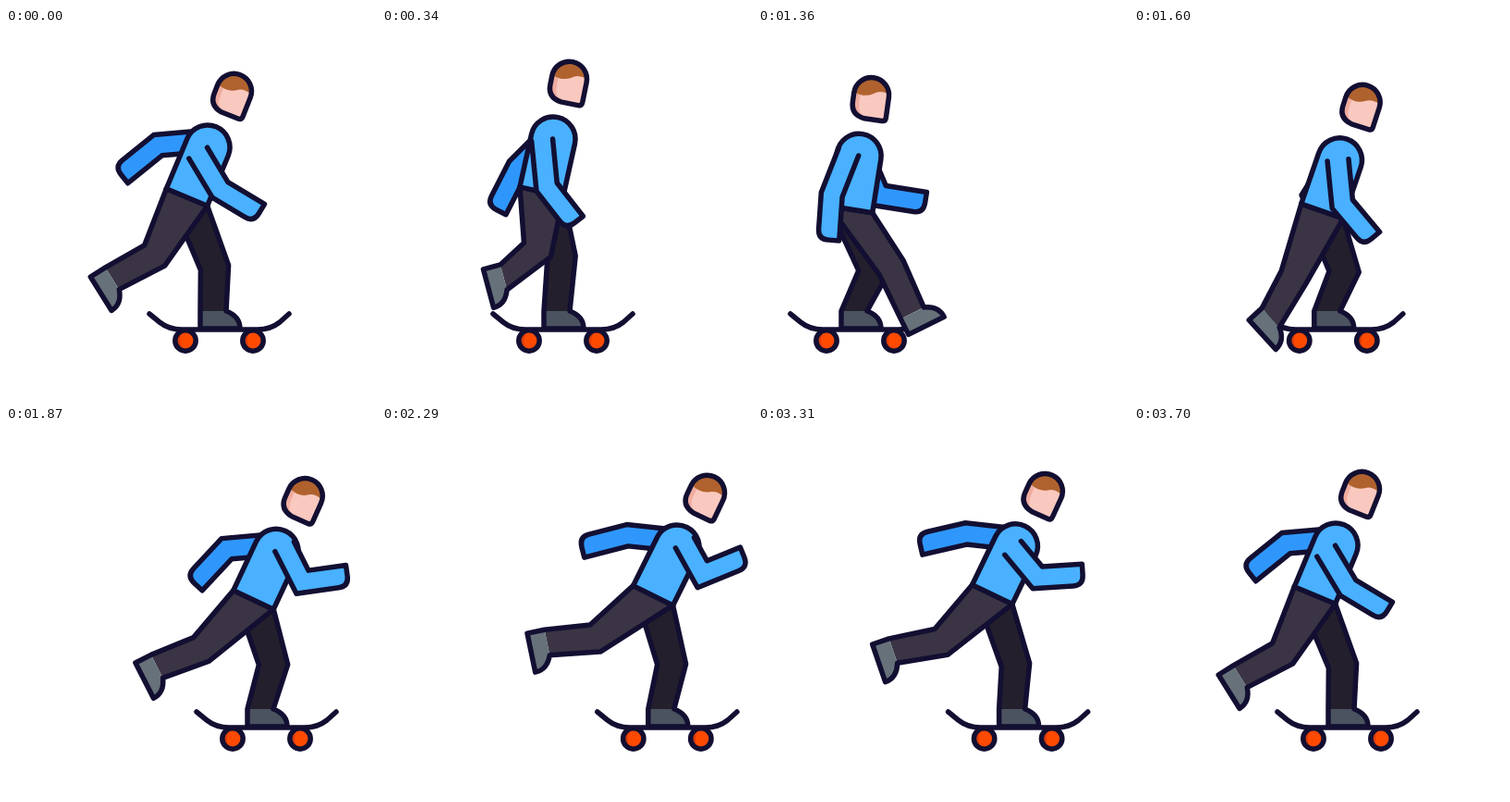
Animation, 400 px wide and 400 px high, one loop 3.76 s. Source, as an HTML page:

```html
<!DOCTYPE html>
<html lang="en">
<head>
<meta charset="utf-8">
<title>Skater</title>
<style>
html, body { margin: 0; width: 100%; height: 100%; overflow: hidden; background: #fff; }
svg { display: block; width: 100vw; height: 100vh; }
.ink { fill: none; stroke: #120f32; stroke-width: 5.5; stroke-linecap: round; stroke-linejoin: round; }
</style>
</head>
<body>
<svg viewBox="0 0 400 400">
  <g id="farArm"><path fill="#2f97fc"/><path class="ink"/></g>
  <g id="farLeg"><path fill="#241f2c"/><path fill="#4a535f"/><path class="ink"/></g>
  <g id="board">
    <path class="ink" d="M-39 309L-28 318Q-18 326-4 326H78Q92 326 102 318L112 309"/>
    <g id="wheel">
      <circle cy="338" r="11.2" fill="#fe4a00"/>
      <path d="M0 327a11 11 0 0 0 0 22q-6-3-6-11t6-11" fill="#d83c0c"/>
      <circle class="ink" cy="338" r="11.2"/>
    </g>
    <use href="#wheel" x="73"/>
  </g>
  <g id="nearLeg"><path fill="#3a3444"/><path fill="#66717a"/><path class="ink"/></g>
  <path id="torso" class="ink" style="fill:#49b1ff"/>
  <g id="nearArm"><path fill="#49b1ff"/><path class="ink"/></g>
  <g id="head">
    <path fill="#f9c8bf" d="M-19-4A19 19 0 0 1 19-4V18Q19 22 15 22H-4Q-19 20-19 6Z"/>
    <path fill="#efac9f" d="M-19-10H-12V6Q-12 18-2 22H-4Q-19 20-19 6Z"/>
    <path fill="#b0622e" d="M-19-4A19 19 0 0 1 19-4L18-8Q8-11 2-6Q-7 0-19-5Z"/>
    <path class="ink" d="M-19-4A19 19 0 0 1 19-4V18Q19 22 15 22H-4Q-19 20-19 6Z"/>
  </g>
</svg>
<script>
const STEPS = 120, LOOP = 3760, HOLD = 130, STEP = 30;
const rad = Math.PI / 180;
const $ = id => document.getElementById(id);

// Periodic monotone cubic through (step, value) pairs.
function track(...flat) {
  const xs = [], ys = [], count = flat.length / 2;
  for (let i = -2; i < count + 3; i++) {
    const j = (i + count) % count;
    xs.push(flat[2 * j] + STEPS * Math.floor(i / count));
    ys.push(flat[2 * j + 1]);
  }
  const rise = i => (ys[i + 1] - ys[i]) / (xs[i + 1] - xs[i]);
  const slope = i => {
    const a = rise(i - 1), b = rise(i);
    if (a * b <= 0) return 0;
    const h0 = xs[i] - xs[i - 1], h1 = xs[i + 1] - xs[i];
    const p = 2 * h1 + h0, q = h1 + 2 * h0;
    return (p + q) / (p / a + q / b);
  };
  return n => {
    let i = 2;
    while (xs[i + 1] < n) i++;
    const h = xs[i + 1] - xs[i], u = (n - xs[i]) / h, v = 1 - u;
    return ys[i] * v * v * (1 + 2 * u) + ys[i + 1] * u * u * (3 - 2 * u)
      + h * u * v * (slope(i) * v - slope(i + 1) * u);
  };
}

const boardX = track(0, 194, 8, 159, 18, 121, 27, 92, 36, 68, 38, 67.3, 42, 74,
  46, 118, 51, 192, 54, 222, 59, 245, 72, 271, 82, 276, 91, 274, 108, 242);
const hipX = track(0, 1.5, 8, 13.4, 27, 25, 42, 26, 59, 22.5, 91, 19.5);
const hipY = track(0, 183, 8, 177, 18, 169.5, 27, 167, 36, 170, 42, 196, 46, 201, 51, 197, 59, 188, 91, 181);
const lean = track(0, 22.6, 8, 12.5, 27, -4, 36, -2, 42, 9, 59, 25, 91, 27);
const kneeX = track(0, 31.5, 8, 35, 27, 38.5, 42, 51, 59, 44, 91, 38.5);
const kneeY = track(0, 259, 8, 248, 27, 245, 36, 248, 42, 263, 46, 265, 59, 258, 91, 257.5);

const thigh = track(0, 119, 8, 94, 27, 34, 36, 38, 42, 55, 46, 77, 51, 119, 59, 136.6, 91, 146.6);
const thighLen = track(0, 72, 8, 63, 27, 85, 42, 77, 59, 78, 91, 77);
const shin = track(0, 151.5, 8, 141, 27, 50.4, 36, 52, 42, 65.3, 46, 94, 51, 125, 59, 159, 91, 182.7);
const shinLen = track(0, 52, 8, 47, 27, 49, 42, 54, 46, 57, 51, 50, 59, 51, 91, 53);
const foot = track(0, 58, 8, 75, 27, -45, 36, -40, 42, -26.5, 46, 12, 51, 52, 59, 63, 91, 89);

const nearUpper = track(0, 73.6, 8, 97.6, 27, 146, 42, 125, 59, 50, 91, 46);
const nearLen = track(0, 48, 8, 52.5, 27, 56.6, 42, 51.3, 59, 44, 91, 37.5);
const nearFore = track(0, 31, 8, 52, 27, 92, 42, 94, 59, -8, 91, -29);
const nearSide = track(0, -12, 8, -12, 27, -11, 42, -12, 59, 10, 91, 8);
const farUpper = track(0, 175, 8, 135, 27, 32, 42, 67, 59, 175, 91, 191);
const farFore = track(0, 141, 8, 117, 27, -14, 42, 9, 59, 133, 91, 183);

const polar = (p, deg, r) => [p[0] + r * Math.cos(deg * rad), p[1] + r * Math.sin(deg * rad)];
const angle = (a, b) => Math.atan2(b[1] - a[1], b[0] - a[0]) / rad;
const str = p => p[0].toFixed(2) + ' ' + p[1].toFixed(2);
const poly = pts => 'M' + pts.map(str).join('L');

function setPaths(id, ...list) {
  const paths = $(id).children;
  list.forEach((d, i) => paths[i].setAttribute('d', d));
}

function drawLeg(id, hip, back, front, knee, ankle, turn) {
  const a = angle(hip, knee);
  const bend = ((angle(knee, ankle) - a + 540) % 360) - 180;
  const across = a + bend / 2 + 90, half = 15 / Math.cos(bend / 2 * rad);
  const kneeBack = polar(knee, across, half), kneeFront = polar(knee, across, -half);
  const at = (x, y) => polar(polar(ankle, turn, x), turn + 90, y);
  const heel = at(-14, 0), instep = at(14, 0);
  const shoe = `L${str(at(-14, 19))}L${str(at(29, 19))}C${str(at(29, 8))} ${str(at(22, 3))} ${str(instep)}`;
  const upper = poly([front, back, kneeBack, heel]);
  setPaths(id,
    poly([front, back, kneeBack, heel, instep, kneeFront]) + 'Z',
    'M' + str(heel) + shoe + 'Z',
    upper + shoe + 'L' + str(kneeFront) + 'Z');
}

function drawArm(id, start, elbow, fore, length) {
  const w = 11.5, a = angle(start, elbow);
  const bend = ((fore - a + 540) % 360) - 180;
  const across = a + bend / 2 - 90, half = w / Math.cos(bend / 2 * rad);
  const hand = polar(elbow, fore, length);
  const corner = polar(hand, fore - 90, -w);
  const d = poly([polar(start, a - 90, w), polar(elbow, across, half), polar(hand, fore - 90, w), hand])
    + `Q${str(corner)} ${str(polar(corner, fore, -11))}`
    + 'L' + str(polar(elbow, across, -half)) + 'L' + str(polar(start, a - 90, -w));
  setPaths(id, d, d);
}

function draw(n) {
  const x = boardX(n), tilt = lean(n);
  const hip = [x + hipX(n), hipY(n)];
  const neck = polar(hip, tilt - 90, 58.5);
  const back = polar(hip, tilt, -24), front = polar(hip, tilt, 24);

  $('board').setAttribute('transform', `translate(${x.toFixed(2)} 0)`);
  drawLeg('farLeg', hip, back, front, [x + kneeX(n), kneeY(n)], [x + 30, 306], 0);
  const knee = polar(hip, thigh(n), thighLen(n));
  drawLeg('nearLeg', hip, back, front, knee, polar(knee, shin(n), shinLen(n)), foot(n));

  $('torso').setAttribute('d', `M${str(back)}L${str(polar(neck, tilt, -24))}`
    + `A24 24 0 0 1 ${str(polar(neck, tilt, 24))}L${str(front)}Z`);

  const farStart = [neck[0], neck[1] - 7];
  drawArm('farArm', farStart, polar(farStart, farUpper(n), 54), farFore(n), 51);

  // The near arm hangs from one side of the shoulder circle.
  const side = nearSide(n), reach = nearLen(n), swing = nearUpper(n);
  const line = swing + Math.asin(side / reach) / rad;
  drawArm('nearArm', polar(neck, line - 90, side), polar(neck, swing, reach), nearFore(n), 49);

  const head = polar(neck, tilt - 87.2, 63);
  $('head').setAttribute('transform', `translate(${str(head)}) rotate(${(tilt - 1).toFixed(2)})`);
}

const begin = performance.now();
function tick() {
  const t = Math.max(0, performance.now() - begin) % LOOP;
  draw(t < HOLD ? 0 : Math.min(STEPS, Math.floor((t - HOLD) / STEP) + 1));
  requestAnimationFrame(tick);
}
tick();
</script>
</body>
</html>
```
